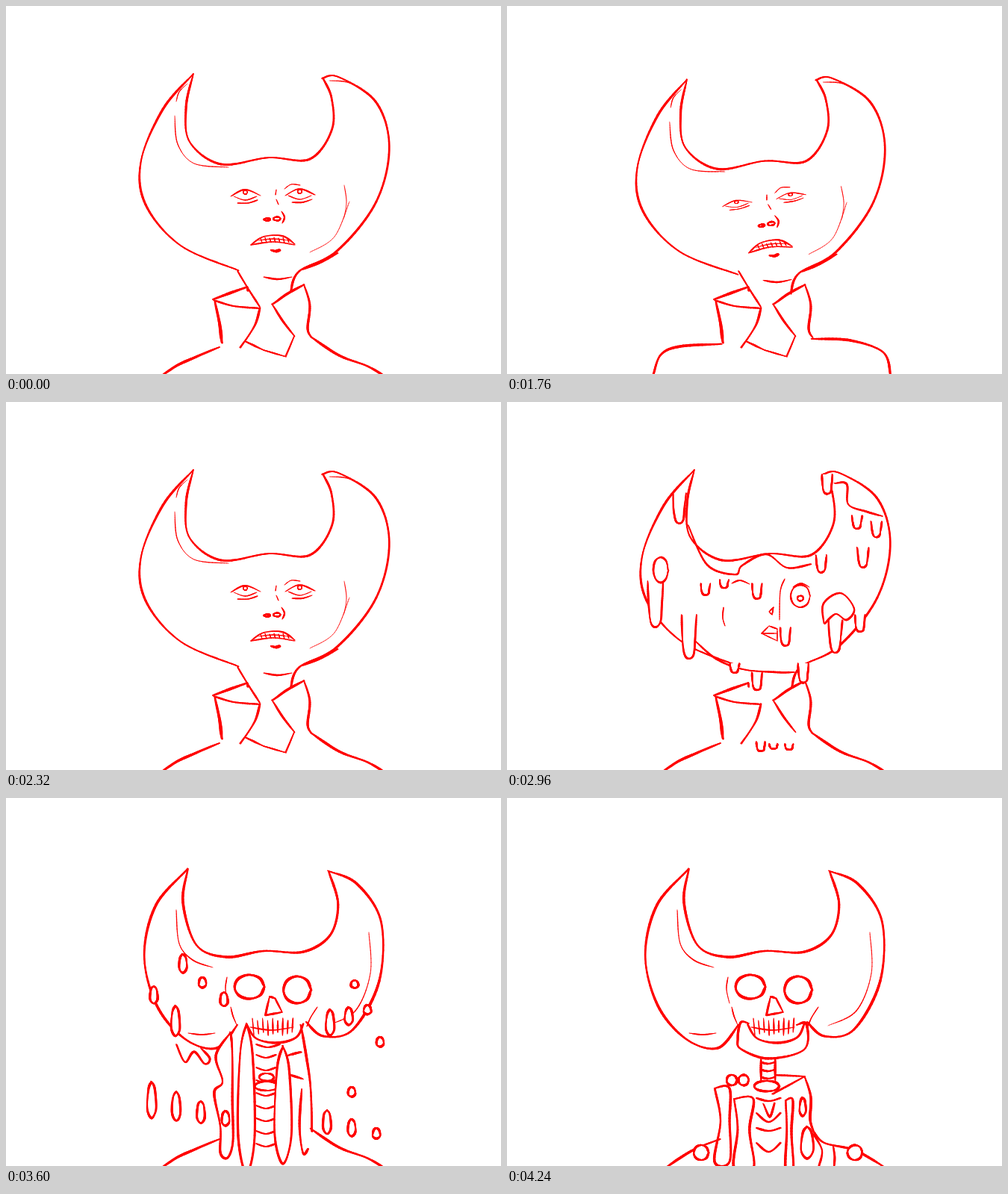
These frames come from a looping animation (663x493 px, 4880 ms). An HTML page with a canvas:

```html
<!DOCTYPE html>
<html lang="en">
<head>
<meta charset="utf-8">
<title>Melting head</title>
<style>
  html, body { margin: 0; width: 100%; height: 100%; overflow: hidden; background: #fff; }
  canvas { display: block; }
</style>
</head>
<body>
<canvas id="stage" width="663" height="493"></canvas>
<script>
const LOOP = 4880, STEP = 80;
const ctx = document.getElementById('stage').getContext('2d');
const mix = (a, b, u) => a + (b - a) * u;
const times = (n, fn) => Array.from({ length: n }, (_, i) => fn(i));

// Smooth curve through a few key points, returned as short steps.
function spline(p) {
  const N = 12, last = p.length - 1, out = [];
  for (let i = 0; i < last; i++) {
    const a = p[Math.max(0, i - 1)], b = p[i], c = p[i + 1], d = p[Math.min(last, i + 2)];
    for (let j = 0; j < N; j++) {
      const u = j / N;
      out.push([0, 1].map(k => b[k] + .5 * u * (c[k] - a[k] + u * (2 * a[k] - 5 * b[k] + 4 * c[k] - d[k]
        + u * (3 * (b[k] - c[k]) + d[k] - a[k])))));
    }
  }
  return [...out, p[last]];
}

// Brush stroke of uneven width with a second, wandering pass.
function pen(w, pts, fill) {
  const path = spline(pts), seed = pts[0][0], n = path.length;
  if (fill) {
    ctx.beginPath();
    path.forEach(p => ctx.lineTo(...p));
    ctx.fill();
  }
  for (let i = 1; i < n; i++) {
    const end = Math.min(1, .5 + Math.min(i, n - i) / 12);
    ctx.lineWidth = w * end * (.92 + .2 * Math.sin(i * .23 + seed));
    ctx.beginPath();
    ctx.moveTo(...path[i - 1]);
    ctx.lineTo(...path[i]);
    ctx.stroke();
  }
  if (w < 2.4) return;
  ctx.lineWidth = w * .5;
  ctx.beginPath();
  path.forEach(([x, y], i) => {
    const o = 1.1 * Math.sin(i * .15 + seed);
    ctx.lineTo(x + o, y + o * .6);
  });
  ctx.stroke();
}

const pairs = n => times(n.length / 2, i => [n[2 * i], n[2 * i + 1]]);
const line = (w, ...n) => pen(w, pairs(n));
const sharp = (w, ...n) => pairs(n).reduce((a, b) => (pen(w, [a, b]), b));
const smile = (w, x0, x1, y, sag) => line(w, x0, y, (x0 + x1) / 2, y + sag, x1, y);

function oval(w, x, y, rx, ry = rx) {
  pen(w, times(9, i => [x + rx * Math.cos(i * Math.PI / 4), y + ry * Math.sin(i * Math.PI / 4)]), true);
}

// Open drip hanging from its top edge.
function drip(x, top, len, g) {
  const r = 5 + len / 20, h = len * g;
  pen(2.5, pairs([x - r, top, x - r * .9, top + h * .5, x - r * .6, top + h * .9, x, top + h,
    x + r * .6, top + h * .88, x + r * .8, top + h * .5, x + r, top]), true);
}

// Closed drop, narrow above and heavy below.
function drop(x, top, len, r = 4.5 + len / 40) {
  pen(2.9, pairs([x, top, x - r * .75, top + len * .2, x - r, top + len * .75, x, top + len,
    x + r, top + len * .75, x + r * .75, top + len * .2, x, top]), true);
}

// Long bone, pinched in the middle.
function bone(x, top, len, r, lean = 0) {
  pen(3.2, pairs([x - r, top, x - r * .6 + lean, top + len * .45, x - r, top + len, x + r, top + len,
    x + r * .6 + lean, top + len * .45, x + r, top, x - r, top]), true);
}

function at(x, y, dx, dy, angle, draw, sy = 1) {
  ctx.save();
  ctx.translate(x + dx, y + dy);
  ctx.rotate(angle);
  ctx.scale(1, sy);
  ctx.translate(-x, -y);
  draw();
  ctx.restore();
}

function ramp(t, ...keys) {
  const i = keys.findIndex(k => t < k[0]);
  if (i < 0) return keys[keys.length - 1][1];
  if (!i) return keys[0][1];
  const [t0, v0] = keys[i - 1], [t1, v1] = keys[i];
  return mix(v0, v1, (t - t0) / (t1 - t0));
}

function outline() {
  line(2.7, 251, 91, 210, 138, 181, 207, 187, 266, 234, 321, 311, 354);
  line(2.7, 251, 91, 241, 135, 246, 182, 288, 212, 352, 203, 407, 205, 437, 165, 436, 123, 424, 96);
  line(2.7, 423, 97, 445, 95, 495, 128, 513, 187, 496, 262, 444, 328, 393, 355, 381, 382);
}

function eye(x, y, gaze) {
  line(1.9, x - 20, y + 6, x - 1, y - 3, x + 20, y + 5);
  smile(1.4, x - 16, x + 15, y + 6, 5);
  line(1.9, x - 11, y + 15, x + 3, y + 15, x + 16, y + 11);
  ctx.fillStyle = '#fff';
  oval(1.3, x - .5 + gaze, y + .5 + Math.abs(gaze) * .15, 2.8);
}

function drawFace(gaze, squint) {
  at(357, 252, 0, 0, 0, () => {
    eye(321, 249, gaze);
    eye(394, 248, gaze);
  }, 1 - squint);
  line(1.3, 373, 245, 382, 239, 394, 240);
  line(1.6, 362, 246, 361, 253);
  line(1.6, 362, 259, 365, 266);
  line(2, 369, 275, 373, 283, 370, 291);
  oval(2.2, 350, 286, 4.3, 1.7);
  oval(2.2, 363, 285, 4.8, 2.4);
  line(2, 328, 320, 345, 309, 370, 308, 387, 319);
  line(2, 328, 320, 358, 316, 387, 320);
  times(7, i => line(1.4, 341 + i * 6, 311 - i % 2, 343 + i * 6, 317));
  line(1.2, 338, 314, 358, 312, 379, 314);
  smile(3.8, 355, 367, 327, 1.5);
}

function drawHead(gaze, s, sag) {
  at(362, 424, 0, 4 * s, -.03 * s, () => {
    outline();
    line(2.6, 445, 331, 420, 344, 396, 353);
    line(1.1, 243, 104, 232, 115, 228, 128);
    line(1.2, 226, 147, 230, 185, 252, 211, 298, 216);
    line(1.2, 433, 100, 460, 103, 488, 121);
    line(.9, 453, 240, 456, 262, 453, 283);
    line(1, 460, 262, 440, 309, 407, 330);
    smile(2.2, 345, 383, 363, 3);
  });
  at(357, 315, -5 * s, 7 * s + sag, -.13 * s, () => drawFace(gaze, .35 * s));
}

function drawShoulders(s) {
  const to = (...n) => pairs(n.map(([a, b]) => mix(a, b, s)).flat());
  pen(3.3, to([286, 288], [457, 453], [255, 232], [470, 456], [230, 206], [481, 467], [208, 196], [495, 495]));
  pen(3.3, to([408, 408], [443, 446], [446, 460], [468, 448], [483, 504], [482, 464], [506, 514], [495, 495]));
}

function drawCollar(melted) {
  sharp(3.2, 277, 393, 323, 376, 324, 382);
  line(2.8, 278, 394, 305, 402, 339, 405);
  line(2.8, 340, 404, 333, 428, 314, 458);
  line(4, 280, 396, 286, 425, 289, 451);
  line(3, 357, 400, 376, 386, 399, 373);
  line(3, 399, 373, 407, 400, 404, 432, 409, 444);
  line(2.7, 357, 400, 370, 421, 386, 442);
  if (melted) return;
  sharp(2.5, 386, 442, 375, 470, 345, 461, 320, 449);
  line(2.6, 310, 355, 324, 378, 340, 403);
}

function drawMelt(g) {
  outline();
  ctx.fillStyle = '#fff';
  line(2.5, 243, 165, 268, 218, 305, 231, 315, 219, 347, 204, 375, 222, 407, 217);
  line(2.5, 250, 318, 280, 344, 316, 358, 360, 362, 385, 362);
  line(2.5, 439, 109, 455, 110, 457, 137, 482, 147, 503, 153);
  // x, top, length
  [[231, 122, 73], [429, 97, 47], [495, 160, 38], [469, 152, 32], [477, 195, 48], [421, 205, 42], [199, 240, 111],
    [440, 292, 79], [473, 285, 41], [244, 285, 106], [266, 243, 28], [291, 238, 20], [335, 243, 37], [373, 302, 44],
    [305, 350, 23], [335, 362, 43], [397, 350, 47], [340, 455, 23], [357, 458, 12], [378, 458, 14]]
    .forEach(d => drip(...d, g));
  oval(2.4, 206, 225, 10, 17);
  line(2.4, 425, 297, 424, 270, 447, 256, 465, 277, 455, 292, 440, 284, 425, 297);
  at(0, 0, 0, 18 * (g - 1), 0, () => {
    oval(2.1, 393, 268, 13, 15);
    oval(2, 393, 271, 4, 3.5);
    smile(1.7, 383, 405, 256, -5);
    line(1.9, 301, 251, 312, 247, 325, 252);
    line(1.7, 372, 245, 366, 262, 365, 300);
    line(1.7, 290, 283, 289, 297, 292, 308);
    sharp(1.9, 341, 318, 351, 308, 362, 312, 362, 328, 341, 318, 362, 318);
    sharp(1.8, 351, 289, 357, 283, 355, 293, 351, 289);
  });
}

function drawSkull() {
  line(3.2, 244, 95, 201, 143, 185, 210, 202, 278, 240, 323, 282, 335, 310, 304);
  line(3.2, 244, 95, 237, 140, 255, 197, 295, 213, 345, 205, 398, 206, 434, 184, 445, 143, 432, 98);
  line(3.2, 432, 98, 470, 115, 502, 165, 500, 245, 465, 310, 425, 319, 402, 300);
  oval(3.5, 326, 253, 20, 16);
  oval(3.5, 390, 257, 18.5, 18);
  sharp(2.8, 353, 266, 360, 268, 370, 287, 347, 291, 353, 266);
  line(3, 322, 303, 335, 322, 362, 328, 388, 321, 398, 302);
  smile(1.8, 327, 385, 307, 4);
  times(9, i => line(2.2, 330 + i * 6.8, 295 + i % 2 * 3, 332 + i * 6.4, 318 - i % 3 * 2));
  line(1.5, 228, 150, 232, 195, 250, 217, 277, 227);
  line(1.3, 486, 180, 488, 235, 468, 285, 430, 305);
  smile(1.7, 244, 280, 315, 2);
  line(1.4, 296, 240, 294, 256, 298, 275);
  line(1.5, 301, 280, 304, 292, 309, 304);
  line(1.7, 417, 280, 408, 294, 403, 306);
}

function drawGoo() {
  times(8, i => smile(2.5, 335, 362, 344 + i * 17, 4));
  oval(2.4, 349, 374, 10, 5);
  oval(2.4, 349, 386, 16, 6);
  line(3, 377, 345, 395, 340);
  line(3, 377, 370, 397, 376);
  ctx.fillStyle = '#fff';
  pen(3, pairs([301, 314, 281, 345, 290, 380, 279, 395, 287, 440, 287, 475, 297, 482, 304, 460, 303, 400, 303, 340, 301, 314]), true);
  drop(322, 302, 200, 11);
  drop(371, 332, 158, 11);
  line(3.2, 395, 304, 402, 345, 408, 390, 410, 447);
  line(3, 396, 390, 393, 440, 398, 476, 405, 470);
  smile(2.8, 335, 367, 330, 4);
  line(2.8, 228, 330, 240, 354, 252, 340, 266, 356, 273, 349, 262, 336);
}

function drawBones() {
  line(3, 324, 302, 313, 301, 309, 322, 313, 336, 350, 349, 398, 337, 401, 303, 388, 304);
  [340, 359].forEach(x => line(3, x, 350, x, 378));
  times(3, i => smile(2.8, 340, 359, 354 + i * 10, 2));
  sharp(3, 360, 371, 399, 373, 356, 397);
  line(3.4, 399, 374, 407, 400, 406, 430, 410, 446);
  times(4, i => smile(2.9, 334, 367, 402 + i * 20, 4 + 8 * (i % 2)));
  line(2.8, 344, 410, 352, 427, 358, 408);
  ctx.fillStyle = '#fff';
  oval(3, 348, 386, 17, 7);
  bone(288, 389, 98, 10, 4);
  bone(317, 403, 92, 13);
  bone(378, 405, 92, 5);
  drop(396, 401, 25, 4);
  drop(402, 440, 43, 8);
  [301, 317].forEach(x => oval(2.8, x, 378, 7));
  line(3.2, 214, 494, 250, 471, 286, 457);
  line(3.2, 410, 446, 425, 462, 466, 472, 505, 494);
  line(2.7, 410, 450, 422, 472, 418, 494);
  line(2.7, 437, 465, 439, 480, 438, 494);
  [260, 466].forEach(x => oval(2.8, x, 475, 10));
}

function drawDrops(dt) {
  const fall = dt > 0 ? .0019 * dt * dt : 0, grow = Math.min(1, 1 + dt / 400);
  const d = (x, top, len) => drop(x, top + fall, len * grow);
  ctx.fillStyle = '#fff';
  d(198, 252, 58);
  d(227, 278, 102);
  d(237, 209, 63);
  d(263, 240, 35);
  d(292, 260, 47);
  d(467, 244, 26);
  times(3, i => d(434 + 25 * i, 283 - 3 * i, 88 - 28 * i));
  times(4, i => d(195 + 33 * i, 380 + 13 * i, 122 - 24 * i));
  times(3, i => d(430 + 33 * i, 418 + 12 * i, 80 - 22 * i));
  times(2, i => d(463 + 38 * i, 387 - 67 * i, 33));
}

function render(t) {
  const gaze = ramp(t, [320, 0], [560, -10], [800, -10], [1200, 10], [1360, 10], [1760, 0]);
  const shrug = ramp(t, [1360, 0], [1840, 1.2], [2000, 1.2], [2320, 0]);
  const melt = ramp(t, [2560, 0], [3280, 1], [3600, 1.4]);
  ctx.fillStyle = '#fff';
  ctx.fillRect(0, 0, 663, 493);
  ctx.strokeStyle = '#f00';
  ctx.lineCap = ctx.lineJoin = 'round';

  if (t < 4080) drawShoulders(shrug);
  if (t < 3600) {
    drawCollar(melt > .4);
    if (melt > .4) drawMelt(melt);
    else drawHead(gaze, shrug, melt * 14);
    return;
  }
  drawSkull();
  if (t < 4080) drawGoo();
  else drawBones();
  if (t < 4240) drawDrops(t - 3840);
}

let shown = -1;
function tick() {
  const t = Math.floor(performance.now() % LOOP / STEP) * STEP;
  if (t !== shown) render(shown = t);
  requestAnimationFrame(tick);
}
tick();
</script>
</body>
</html>
```
